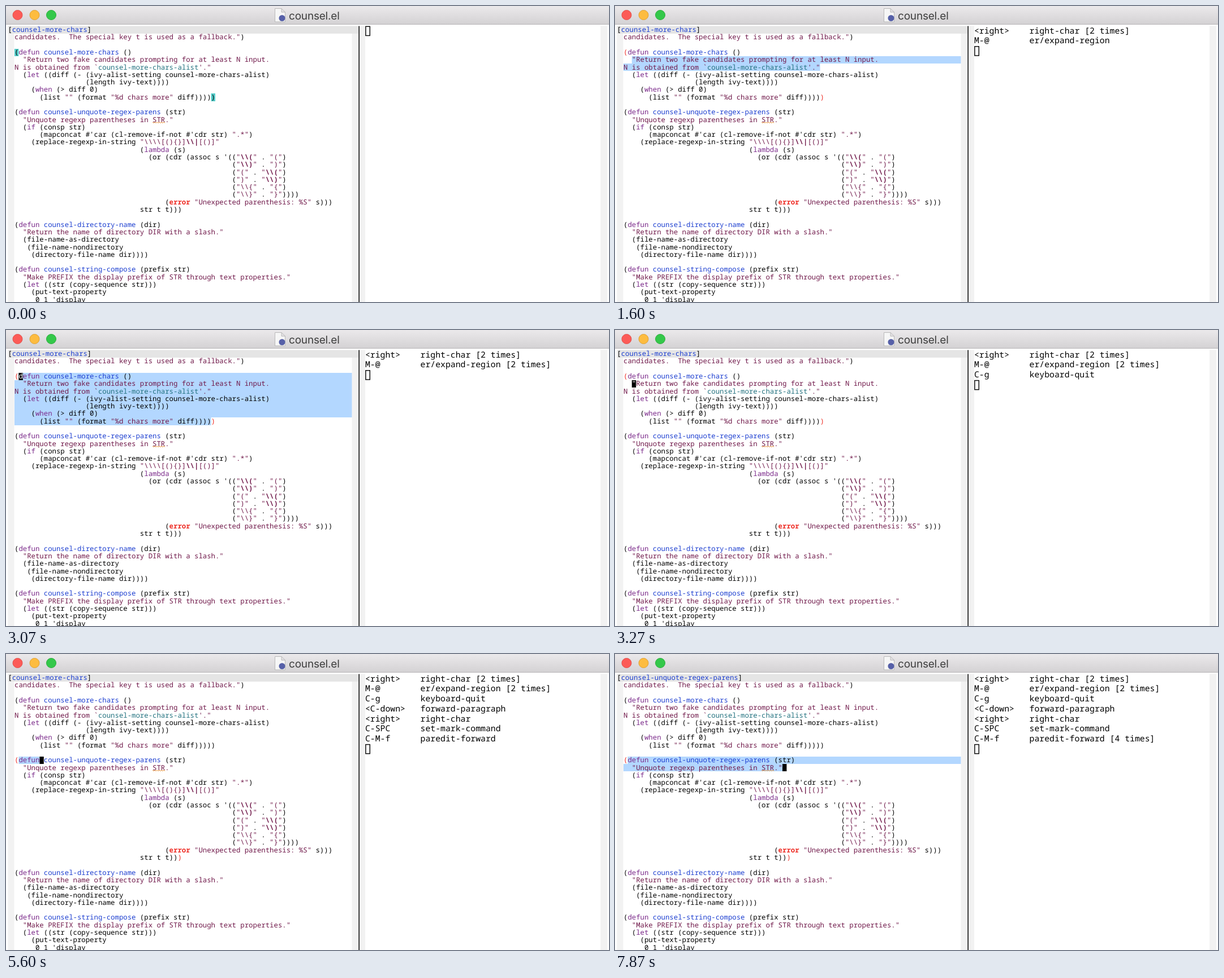
Animation, 1066 px wide and 525 px high, one loop 8000 ms. Source, as an HTML page with a canvas:

```html
<!DOCTYPE html>
<html lang="en">
<head>
<meta charset="utf-8">
<title>counsel.el</title>
<style>
html, body { margin: 0; width: 100%; height: 100%; overflow: hidden; background: #fff; }
canvas { display: block; }
</style>
</head>
<body>
<canvas id="stage" width="1066" height="525"></canvas>
<pre id="code" hidden>
candidates.  The special key t is used as a fallback.")

(defun counsel-more-chars ()
  "Return two fake candidates prompting for at least N input.
N is obtained from `counsel-more-chars-alist'."
  (let ((diff (- (ivy-alist-setting counsel-more-chars-alist)
                 (length ivy-text))))
    (when (> diff 0)
      (list "" (format "%d chars more" diff)))))

(defun counsel-unquote-regex-parens (str)
  "Unquote regexp parentheses in STR."
  (if (consp str)
      (mapconcat #'car (cl-remove-if-not #'cdr str) ".*")
    (replace-regexp-in-string "\\\\[(){}]\\|[()]"
                              (lambda (s)
                                (or (cdr (assoc s '(("\\(" . "(")
                                                    ("\\)" . ")")
                                                    ("(" . "\\(")
                                                    (")" . "\\)")
                                                    ("\\{" . "{")
                                                    ("\\}" . "}"))))
                                    (error "Unexpected parenthesis: %S" s)))
                              str t t)))

(defun counsel-directory-name (dir)
  "Return the name of directory DIR with a slash."
  (file-name-as-directory
   (file-name-nondirectory
    (directory-file-name dir))))

(defun counsel-string-compose (prefix str)
  "Make PREFIX the display prefix of STR through text properties."
  (let ((str (copy-sequence str)))
    (put-text-property
     0 1 'display</pre>
<script>
const ctx = document.getElementById('stage').getContext('2d');
const MONO = '"Noto Sans Mono", "DejaVu Sans Mono", monospace';
const BLUE = '#1d3fd0', RED = '#ee2c24', TEAL = '#55cdca', FRINGE = '#f2f2f2';
const LEFT = 15, CELL = 7.395, TOP = 49, ROW = 13.29, EDGE = 611.5;
const LOG_X = 635, LOG_CELL = 8.874, LOG_TOP = 35.5, LOG_ROW = 17.75;
const LOOP = 8000;

// Syntax colours; the text begins inside a string, so a quote is put in front.
const code = '"' + document.getElementById('code').textContent;
const colors = Array(code.length).fill('#000');
const bold = Array(code.length).fill(false);
function mark(re, color, heavy) {
  for (const m of code.matchAll(re))
    for (let i = m.index; i < m.index + m[0].length; i++) {
      if (color) colors[i] = color;
      if (heavy) bold[i] = true;
    }
}
mark(/(?<=\()(defun|let|when|if|lambda)\b/g, '#7b2a8a');
mark(/(?<=\(defun )\S+/g, BLUE);
mark(/(?<=\()error/g, RED, true);
mark(/"(\\.|[^"\\])*"/gs, '#70194a');
mark(/(?<=`)[\w-]+/g, '#23727f');
mark(/\\\\[(|)]/g, null, true);

const glyphs = [];
for (let i = 1, r = 0, c = 0; i < code.length; i++, c++) {
  if (code[i] === '\n') { r++; c = -1; }
  else if (code[i] !== ' ') glyphs.push({ ch: code[i], r, c, color: colors[i], bold: bold[i] });
}

// Each event changes part of the state; key adds a line to the command log.
const first = [[2, 0], [8, 47]], second = [[10, 0], [23, 39]], args = [[10, 36], [10, 40]];
const right = ['<right>', 'right-char'], expand = ['M-@', 'er/expand-region'];
const forward = ['C-M-f', 'paredit-forward'];
const on = true, off = false;
const events = [
  [0, { cur: [2, 0], on: off, match: first, red: [], sel: null, head: 'counsel-more-chars' }],
  [130, { on }],
  [330, { cur: [2, 1], key: right }],
  [470, { match: [], red: first }],
  [530, { cur: [2, 2], key: right }],
  [670, { cur: [3, 2] }],
  [1070, { sel: [3, 2, 4, 47], key: expand }],
  [1600, { on: off }],
  [2070, { on, cur: [2, 1], sel: [2, 1, 8, 47], key: expand }],
  [2600, { on: off }],
  [3070, { on }],
  [3270, { cur: [3, 2], sel: null, key: ['C-g', 'keyboard-quit'] }],
  [3800, { on: off }],
  [3930, { on, cur: [9, 0], key: ['<C-down>', 'forward-paragraph'] }],
  [4070, { red: [] }],
  [4400, { on: off }],
  [4800, { on, cur: [10, 0] }],
  [4930, { cur: [10, 1], key: right }],
  [5070, { red: second }],
  [5270, { key: ['C-SPC', 'set-mark-command'] }],
  [5600, { cur: [10, 6], sel: [10, 1, 10, 6], key: forward }],
  [5730, { cur: [10, 35], sel: [10, 1, 10, 35], key: forward }],
  [5930, { cur: [10, 41], sel: [10, 1, 10, 41], key: forward }],
  [6070, { match: args }],
  [6470, { on: off, head: 'counsel-unquote-regex-parens' }],
  [6870, { on, cur: [11, 38], sel: [10, 1, 11, 38], key: forward }],
  [7000, { match: [] }],
  [7330, { on: off }],
  [7870, { on }]
];

function stateAt(t) {
  const s = {}, log = [];
  for (const [start, change] of events) {
    if (start > t) break;
    Object.assign(s, change);
    if (!change.key) continue;
    const [key, cmd] = change.key, last = log[log.length - 1];
    if (last && last.cmd === cmd) last.n++;
    else log.push({ key, cmd, n: 1 });
  }
  return { ...s, log };
}

const colX = c => LEFT + c * CELL;
const rowY = r => TOP + r * ROW;
const has = (cells, r, c) => cells.some(p => p[0] === r && p[1] === c);

function rect(x, y, x2, y2, color) {
  ctx.fillStyle = color;
  ctx.fillRect(x, y, x2 - x, y2 - y);
}
// Fills part of a text row, on whole pixels so that rows join without seams.
function rowRect(r, x, x2, color) {
  rect(x, Math.round(rowY(r)), x2, Math.round(rowY(r + 1)), color);
}
function cell([r, c], color) {
  rowRect(r, colX(c), colX(c + 1), color);
}
function dot(x, y, radius, fill, line) {
  ctx.beginPath();
  ctx.arc(x, y, radius, 0, 2 * Math.PI);
  ctx.fillStyle = fill;
  ctx.fill();
  if (line) { ctx.strokeStyle = line; ctx.lineWidth = 1; ctx.stroke(); }
}
function setFont(size, weight = 500, family = MONO) {
  ctx.font = `${weight} ${size}px ${family}`;
}
function cells(text, x, y, width) {
  [...text].forEach((ch, i) => ctx.fillText(ch, x + i * width, y));
}

function titleBar() {
  const g = ctx.createLinearGradient(0, 0, 0, 32);
  g.addColorStop(0, '#ebe9eb');
  g.addColorStop(1, '#d4d2d4');
  rect(0, 0, 1066, 32, g);
  rect(0, 32, 1066, 33, '#b6b4b6');
  dot(20.5, 16, 8.5, '#fc5b57', '#e2504b');
  dot(50.5, 16, 8.5, '#fdbc40', '#dfa033');
  dot(80, 16, 8.5, '#34c84a', '#2cae3c');

  ctx.beginPath();
  ctx.moveTo(475.5, 4.5);
  ctx.lineTo(487, 4.5);
  ctx.lineTo(493.5, 11);
  ctx.lineTo(493.5, 28);
  ctx.lineTo(475.5, 28);
  ctx.closePath();
  ctx.moveTo(487, 4.5);
  ctx.lineTo(487, 11);
  ctx.lineTo(493.5, 11);
  ctx.fillStyle = '#f6f6f6';
  ctx.fill();
  ctx.strokeStyle = '#adadad';
  ctx.lineWidth = 0.8;
  ctx.stroke();
  dot(488, 21.5, 5.5, '#5660a8');

  setFont(19, 400, 'Inter, "Open Sans", sans-serif');
  ctx.letterSpacing = '-0.2px';
  ctx.fillStyle = '#3d3d3d';
  ctx.fillText('counsel.el', 500, 23.5);
  ctx.letterSpacing = '0px';
}

function editor(s) {
  rect(3.5, TOP, 14.5, 525, FRINGE);
  rect(EDGE, TOP, 623, 525, FRINGE);
  rect(3.5, 35.5, 623, TOP, '#e5e5e5');
  setFont(12.325);
  ctx.fillStyle = '#000';
  ctx.fillText('[', 3.3, 46);
  ctx.fillStyle = BLUE;
  cells(s.head, 3.3 + CELL, 46, CELL);
  ctx.fillStyle = '#000';
  ctx.fillText(']', 3.3 + (s.head.length + 1) * CELL, 46);

  if (s.sel) {
    const [r0, c0, r1, c1] = s.sel;
    for (let r = r0; r <= r1; r++)
      rowRect(r, colX(r === r0 ? c0 : 0), r === r1 ? colX(c1) : EDGE, '#b3d7ff');
  }
  s.match.forEach(p => cell(p, TEAL));
  if (s.on) cell(s.cur, '#000');

  for (const g of glyphs) {
    const under = s.on && has([s.cur], g.r, g.c);
    setFont(12.325, g.bold ? 700 : 500);
    ctx.fillStyle = under ? (has(s.match, g.r, g.c) ? TEAL : '#fff')
      : has(s.red, g.r, g.c) ? RED : g.color;
    ctx.fillText(g.ch, colX(g.c), rowY(g.r) + 10.4);
  }

  // Spelling mark below STR
  ctx.beginPath();
  for (let i = 0; i <= 11; i++) ctx.lineTo(colX(33) + i * 2, 206 + (i % 2 ? 1.6 : 0));
  ctx.strokeStyle = '#ee9a3a';
  ctx.lineWidth = 1;
  ctx.stroke();
}

function commandLog(log) {
  rect(625, 35.5, 635, 525, FRINGE);
  rect(623.4, 35.5, 624.9, 525, '#000');
  rect(1051, 35.5, 1063, 525, FRINGE);
  setFont(14.79);
  ctx.fillStyle = '#000';
  log.forEach(({ key, cmd, n }, i) => {
    const line = key.padEnd(11) + cmd + (n > 1 ? ` [${n} times]` : '');
    cells(line, LOG_X, LOG_TOP + i * LOG_ROW + 13.1, LOG_CELL);
  });
  ctx.strokeStyle = '#000';
  ctx.lineWidth = 1.4;
  ctx.strokeRect(635.9, LOG_TOP + log.length * LOG_ROW + 0.8, 7.4, 16.2);
}

function draw(now) {
  const s = stateAt(now % LOOP);
  ctx.textRendering = 'geometricPrecision';
  rect(0, 0, 1066, 525, '#fff');
  titleBar();
  editor(s);
  commandLog(s.log);
}

let start;
function tick(now) {
  start ??= now;
  draw(now - start);
  requestAnimationFrame(tick);
}
draw(0);
requestAnimationFrame(tick);
</script>
</body>
</html>
```
